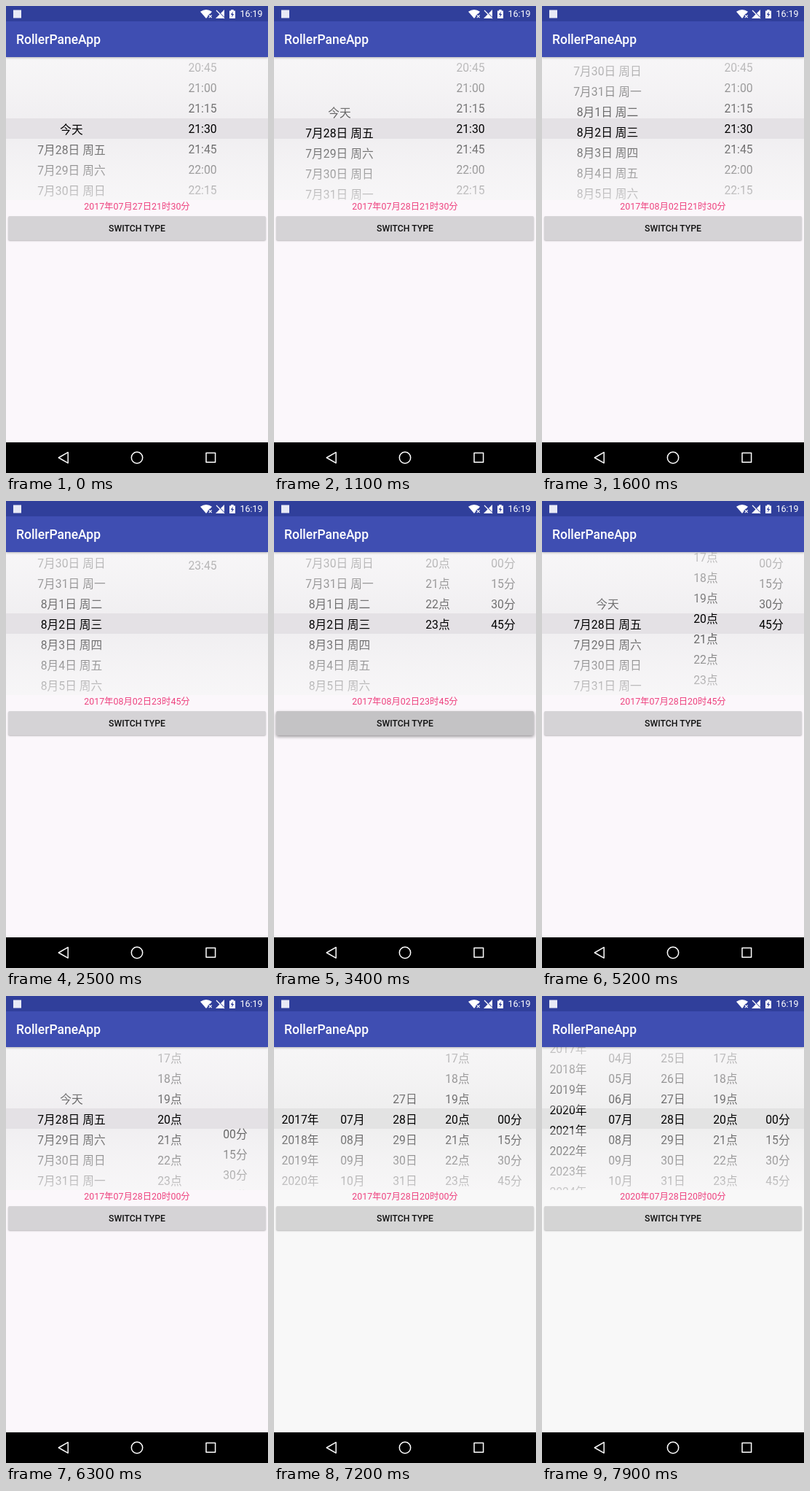
Animation, 360 px wide and 640 px high, one loop 8 s. Source, as an HTML page:

```html
<!DOCTYPE html>
<html lang="zh-CN">
<head>
<meta charset="utf-8">
<title>Wheel picker</title>
<style>
html, body { margin: 0; width: 100%; height: 100%; overflow: hidden; }
body { font-family: Roboto, "Noto Sans CJK SC", "Noto Sans CJK", sans-serif; }
#stage { position: absolute; left: 0; top: 0; width: 360px; height: 640px; overflow: hidden; background: #fbf7fb; }
#stage.plain { background: #f8f8f8; }
#stage > * { position: absolute; left: 0; width: 360px; }
#bar { top: 21px; height: 49px; background: #3f4eb2; box-shadow: 0 1px 3px rgba(0,0,0,.27); }
#bar span { position: absolute; left: 14px; top: 0; line-height: 50px; font-size: 17.5px; font-weight: 500; color: #fff; white-space: nowrap; }
.picker { top: 70px; height: 196px; overflow: hidden; background: #ebe9ec; visibility: hidden; }
.plain .picker { background: #e9e9e9; }
.picker.on { visibility: visible; }
.band { position: absolute; left: 0; top: 84px; width: 100%; height: 28px; background: #e4e1e5; }
.plain .band { background: #e3e3e3; }
.mask { position: absolute; left: 0; width: 100%; height: 84px; }
.mask.up { top: 0; background: linear-gradient(rgba(250,249,250,.81), rgba(250,249,250,.62), rgba(250,249,250,.37)); }
.mask.down { bottom: 0; background: linear-gradient(rgba(250,249,250,.37), rgba(250,249,250,.62), rgba(250,249,250,.81)); }
.col { position: absolute; top: 0; }
.row { position: absolute; left: 0; width: 100%; height: 28px; line-height: 28px; font-size: 15.75px; text-align: center; white-space: nowrap; color: #000; }
#result { top: 266px; height: 18px; line-height: 18px; font-size: 12.4px; text-align: center; color: #ee427f; white-space: nowrap; }
#stage > #button { left: 3px; top: 288px; width: 354px; height: 33px; line-height: 34px; border-radius: 2px; background: #d5d3d6; box-shadow: 0 1px 2px rgba(0,0,0,.25); font-size: 12.25px; font-weight: 500; text-align: center; color: #111; }
#stage.plain > #button { background: #d4d4d4; }
#stage > #button.down { background: #c4c3c5; box-shadow: 0 2px 4px rgba(0,0,0,.4); }
#chrome { top: 0; height: 640px; }
</style>
</head>
<body>
<div id="stage">
  <div class="picker"></div>
  <div class="picker"></div>
  <div class="picker"></div>
  <div id="result"></div>
  <div id="button">SWITCH TYPE</div>
  <div id="bar"><span>RollerPaneApp</span></div>
  <svg id="chrome" width="360" height="640" viewBox="0 0 360 640">
    <rect width="360" height="21" fill="#303f9b"/>
    <rect x="10" y="5.5" width="11" height="11" fill="#e8eaf6"/>
    <g fill="#fff">
      <path d="M275 17L267 7.8Q275 2 283 7.8Z"/>
      <path d="M288 17H300V5Z"/>
      <path d="M307 6.5H309.3V5H312.7V6.5H315V17H307Z"/>
      <text x="321.5" y="15.3" font-size="12.5">16:19</text>
    </g>
    <path d="M311.8 7.5L308.8 12H310.7L310.2 15.5L313.2 11H311.3Z" fill="#303f9b"/>
    <g fill="none" stroke="#303f9b" stroke-width="4">
      <path d="M278.5 12L283 16.5M283 12L278.5 16.5"/>
      <path stroke-width="1.2" d="M290.2 6L300.5 16.3"/>
      <path stroke="#fff" stroke-width="1.2" d="M278.8 12.3L282.7 16.2M282.7 12.3L278.8 16.2M289 6L300 17"/>
    </g>
    <rect y="598" width="360" height="42" fill="#000"/>
    <g fill="none" stroke="#fff" stroke-width="1.5" stroke-linejoin="round">
      <path d="M72.3 619L85.2 611.7V626.3Z"/>
      <circle cx="180" cy="619" r="7.7"/>
      <rect x="275" y="612.6" width="12.6" height="12.6"/>
    </g>
  </svg>
</div>
<script>
const LOOP = 8000, STEP = 100, ROW = 28;
const stage = document.getElementById('stage');
const result = document.getElementById('result');
const button = document.getElementById('button');
const pickers = [...document.querySelectorAll('.picker')];

const pad = n => String(n).padStart(2, '0');
const list = (n, label) => Array.from({ length: n }, (_, i) => label(i));
const dayOf = i => new Date(2017, 6, 27 + i);

const days = list(20, i => {
  const d = dayOf(i);
  return i ? `${d.getMonth() + 1}月${d.getDate()}日 周${'日一二三四五六'[d.getDay()]}` : '今天';
});
const times = list(96, i => pad(i >> 2) + ':' + pad(i % 4 * 15));
const hours = list(24, i => pad(i) + '点');
const minutes = list(4, i => pad(i * 15) + '分');
const years = list(20, i => 2017 + i + '年');
const months = list(12, i => pad(i + 1) + '月');
const monthDays = list(31, i => pad(i + 1) + '日');

function add(parent, cls, text = '') {
  const el = document.createElement('div');
  el.className = cls;
  el.textContent = text;
  parent.append(el);
  return el;
}

// track: [time, row, ease-out power]
function column(left, width, items, track, shift = 2) {
  return { left, width, items, track, shift };
}

const wheels = [
  [
    column(0, 180, days, [[1050, 0], [1600, 5.857, 1.6], [1800, 6, 2]]),
    column(180, 180, times, [[1900, 86], [2500, 97.83, 1.5], [2600, 98, 1], [3000, 95, 1.8]], 0.5)
  ],
  [
    column(0, 180, days, [[4000, 6], [4200, 5.3, 1], [4650, 1.3, 1.2], [4900, 1, 2]]),
    column(180, 90, hours, [[4850, 23], [5200, 20.28, 1.3], [5450, 20, 2]]),
    column(270, 90, minutes, [[5500, 3], [5850, 0.2, 1], [6100, -2, 1.6], [6300, -0.714, 1], [6500, 0, 1.8]])
  ],
  [
    column(0, 72, years, [[7350, 0], [7900, 3.45, 1.1]]),
    column(72, 72, months, [[0, 6]]),
    column(144, 72, monthDays, [[0, 27]]),
    column(216, 72, hours, [[0, 20]]),
    column(288, 72, minutes, [[0, 0]])
  ]
];

wheels.forEach((cols, i) => {
  add(pickers[i], 'band');
  for (const c of cols) {
    c.el = add(pickers[i], 'col');
    c.el.style.left = c.left + 'px';
    c.el.style.width = c.width + 'px';
    c.rows = c.items.map((text, n) => {
      const row = add(c.el, 'row', text);
      row.style.top = n * ROW + 'px';
      return row;
    });
  }
  add(pickers[i], 'mask up');
  add(pickers[i], 'mask down');
});

function valueAt(track, t) {
  if (t <= track[0][0]) return track[0][1];
  for (let i = 1; i < track.length; i++) {
    const [t0, a] = track[i - 1], [t1, b, power] = track[i];
    if (t < t1) return a + (b - a) * (1 - (1 - (t - t0) / (t1 - t0)) ** power);
  }
  return track[track.length - 1][1];
}

function stamp(y, m, d, h, min) {
  return `${y}年${pad(m)}月${pad(d)}日${pad(h)}时${pad(min)}分`;
}

function describe(type, s) {
  if (type === 2) return stamp(2017 + s[0], s[1] + 1, s[2] + 1, s[3], s[4] * 15);
  const d = dayOf(s[0]);
  const [h, q] = type ? [s[1], s[2]] : [s[1] >> 2, s[1] % 4];
  return stamp(d.getFullYear(), d.getMonth() + 1, d.getDate(), h, q * 15);
}

// Choices before today are absent in the first year.
function limit(col, first) {
  col.rows.forEach((row, i) => { row.style.display = i < first ? 'none' : ''; });
}

function draw(t) {
  const type = t < 3400 ? 0 : t < 7000 ? 1 : 2;
  stage.classList.toggle('plain', type === 2);
  button.classList.toggle('down', (t >= 3300 && t < 3500) || (t >= 6900 && t < 7100));
  pickers.forEach((p, i) => p.classList.toggle('on', i === type));

  const picked = wheels[type].map(c => {
    const pos = valueAt(c.track, t);
    c.el.style.transform = `translateY(${84 + c.shift - pos * ROW}px)`;
    return Math.max(0, Math.min(c.items.length - 1, Math.round(pos)));
  });
  if (type === 2) {
    limit(wheels[2][1], picked[0] ? 0 : 6);
    limit(wheels[2][2], picked[0] ? 0 : 26);
  }
  result.textContent = describe(type, picked);
}

const start = performance.now();
function tick(now) {
  const t = Math.max(0, now - start) % LOOP;
  draw(Math.floor(t / STEP) * STEP);
  requestAnimationFrame(tick);
}
draw(0);
requestAnimationFrame(tick);
</script>
</body>
</html>
```
